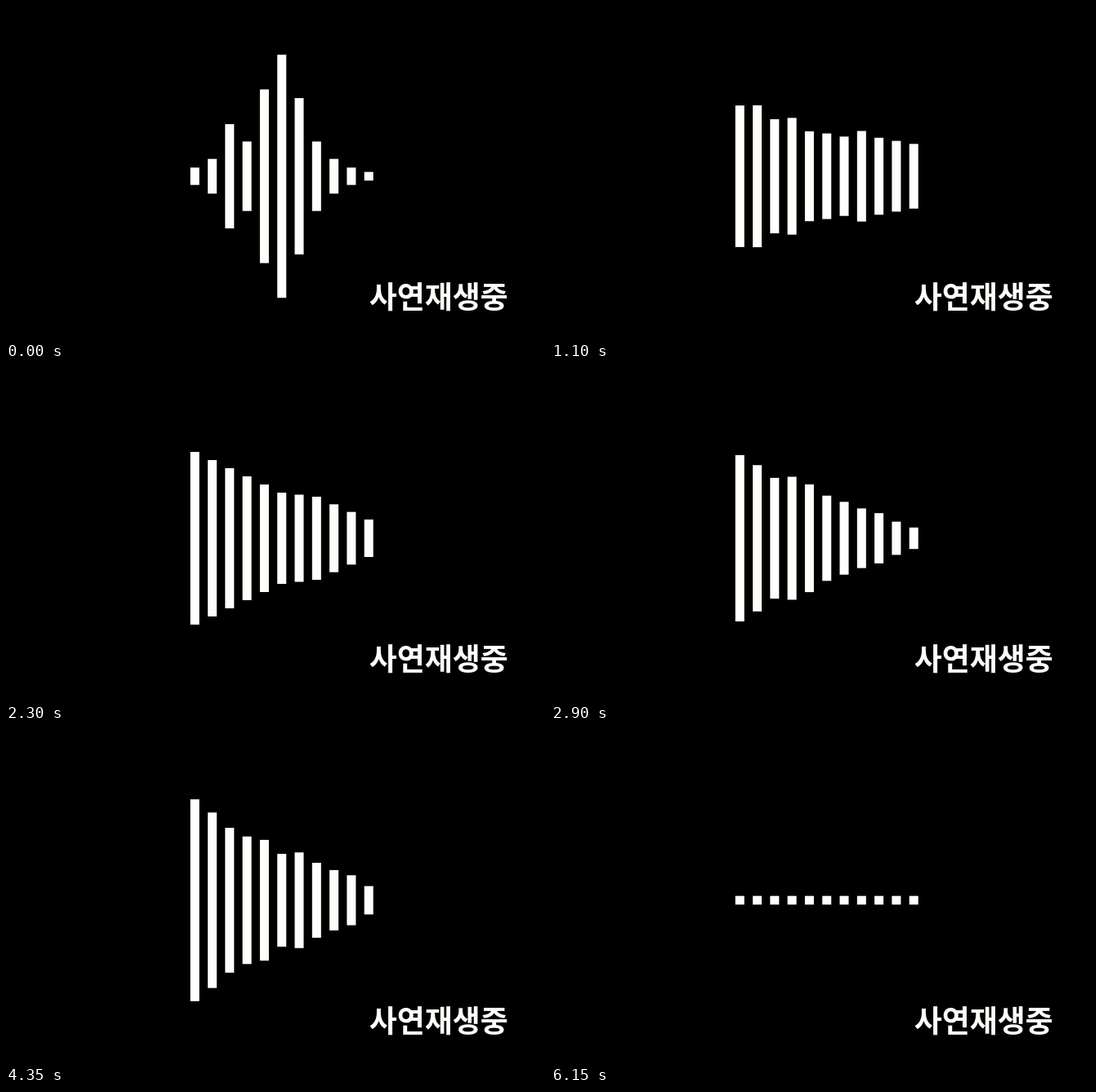
These frames come from a looping animation (660 px wide and 410 px high, 6200 ms). An HTML page:

```html
<!DOCTYPE html>
<html lang="ko">
<head>
<meta charset="utf-8">
<style>
  html, body { margin: 0; width: 100%; height: 100%; overflow: hidden; background: #000; }
  svg { display: block; width: 660px; height: 410px; }
  text { font: 700 37px "Noto Sans CJK KR", "Noto Sans CJK", sans-serif; }
</style>
</head>
<body>
<svg viewBox="0 0 660 410">
  <g id="bars" fill="#fffefa"></g>
  <text x="444.7" y="371" fill="#fffefa">사연재생중</text>
</svg>
<script>
const LOOP = 6200, STEP = 50, COUNT = 11;
const MID = 209, UNIT = 5.33, PITCH = 21.3, BAR_WIDTH = 11;
const ATTACK = 200, FADE_RATE = 0.214;

// The idle icon, in units of half height.
const ICON = [2, 4, 12, 8, 20, 28, 18, 8, 4, 2, 1];

// Outline of the spectrum: half heights at a few bands, joined by straight lines.
const BANDS = [0, 2, 5, 7, 10];
const POSES = [
  { at: 50, outline: BANDS.map(() => UNIT) },
  { at: 550, outline: [86, 89, 62, 68, 46] },
  { at: 1650, outline: [100, 60, 58, 33, 26] },
  { at: 2300, outline: [106, 86, 56, 51, 23] },
  { at: 3500, outline: [103, 61, 48, 17, 13] },
  { at: 4575, outline: [125, 94, 62, 48, 24] },
  { at: 5100, outline: [108, 44, 51, 39, 30] },
  { at: 5650, outline: [102, 92, 66, 45, 20] }
];
const LAST = POSES[POSES.length - 1];

const bars = Array.from({ length: COUNT }, (_, i) => {
  const bar = document.createElementNS("http://www.w3.org/2000/svg", "rect");
  bar.setAttribute("x", 225.7 + i * PITCH);
  bar.setAttribute("width", BAR_WIDTH);
  return document.getElementById("bars").appendChild(bar);
});

const mix = (a, b, p) => a + (b - a) * p;

function hash(n) {
  const s = Math.sin(n * 127.1 + 11.7) * 43758.5453;
  return (s - Math.floor(s)) * 2 - 1;
}

function noise(x, seed) {
  const k = Math.floor(x), p = x - k, n = k + seed * 57;
  return mix(hash(n), hash(n + 1), p * p * (3 - 2 * p));
}

function level(outline, i) {
  const k = Math.max(1, BANDS.findIndex(band => band >= i));
  const p = (i - BANDS[k - 1]) / (BANDS[k] - BANDS[k - 1]);
  return mix(outline[k - 1], outline[k], p);
}

// Loudness is shared by all bars; the upper bands waver more than the bass.
function flutter(i, t) {
  const loudness = 9 * noise(t / 170, 1);
  const detail = 10 * noise(t / 120, i + 2);
  return (loudness + detail) * mix(0.5, 1, Math.min(1, i / 4));
}

function speech(i, t) {
  const k = POSES.findIndex(pose => pose.at > t);
  const from = POSES[k - 1], to = POSES[k];
  const span = k === 1 ? ATTACK : to.at - from.at;
  const p = Math.min(1, (t - from.at) / span);
  const loose = Math.min(1, (t - from.at) / ATTACK, (to.at - t) / ATTACK);
  return mix(level(from.outline, i), level(to.outline, i), p) + loose * flutter(i, t);
}

function halfHeight(i, t) {
  if (t < STEP) return ICON[i] * UNIT;
  const h = t < LAST.at
    ? speech(i, t)
    : level(LAST.outline, i) - (t - LAST.at) * FADE_RATE;
  return Math.max(UNIT, h);
}

function draw(now) {
  const t = Math.floor((now % LOOP) / STEP) * STEP;
  bars.forEach((bar, i) => {
    const h = halfHeight(i, t);
    bar.setAttribute("y", MID - h);
    bar.setAttribute("height", h * 2);
  });
}

const start = performance.now();
function tick() {
  draw(performance.now() - start);
  requestAnimationFrame(tick);
}
tick();
</script>
</body>
</html>
```
